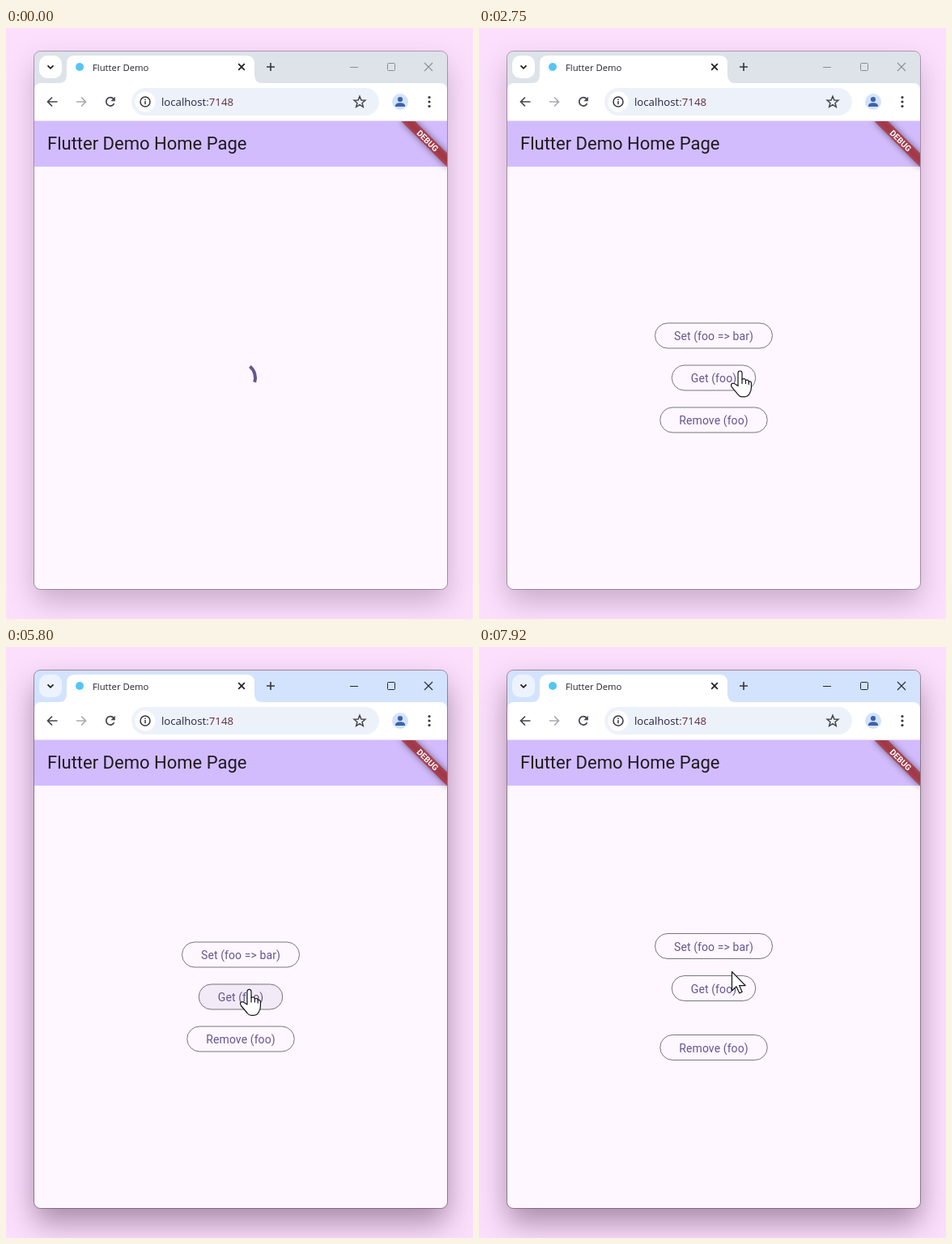
Animation, 577 px wide and 729 px high, one loop 7990 ms. Source, as an HTML page with a canvas:

```html
<!DOCTYPE html>
<html lang="en">
<head>
<meta charset="utf-8">
<title>Flutter Demo</title>
<style>
html, body { margin: 0; width: 100%; height: 100%; overflow: hidden; background: #fcdffd; }
canvas { display: block; width: 577px; height: 729px; }
</style>
</head>
<body>
<canvas id="stage" width="577" height="729"></canvas>
<script>
const W = 577, H = 729, LOOP = 7990;
const PRIMARY = '#65558f', INK = '#1d1b20', DARK = '#33343c';
const ROBOTO = 'Roboto, sans-serif', UI = '"Open Sans", sans-serif';
const stage = document.getElementById('stage').getContext('2d');

function roundRect(c, x, y, w, h, r) {
  c.beginPath();
  c.roundRect(x, y, w, h, r);
}

function fillRound(c, x, y, w, h, r, color) {
  roundRect(c, x, y, w, h, r);
  c.fillStyle = color;
  c.fill();
}

function disc(c, x, y, r, color) {
  c.beginPath();
  c.arc(x, y, r, 0, 7);
  c.fillStyle = color;
  c.fill();
}

function path(c, d, color, width) {
  c.strokeStyle = color;
  c.lineWidth = width;
  c.stroke(new Path2D(d));
}

function text(c, str, x, y, font, color, spacing = 0, align = 'left') {
  c.font = font;
  c.fillStyle = color;
  c.letterSpacing = spacing + 'px';
  c.textAlign = align;
  c.fillText(str, x, y);
}

// ---- browser window ----

function drawTabStrip(c, active) {
  c.fillStyle = active ? '#d3e3fd' : '#dde3e9';
  c.fillRect(35, 29, 510, 50);
  fillRound(c, 41, 34, 28, 28, 10, active ? '#edf3fe' : '#ffffff');
  path(c, 'M51.5 46.3L55 49.8L58.5 46.3', '#1f1f1f', 1.8);

  c.fillStyle = '#fff';
  c.fill(new Path2D('M65 68Q75 68 75 58V44Q75 34 85 34H297Q307 34 307 44V58Q307 68 317 68Z'));
  disc(c, 91, 48, 5, '#54c5f8');
  text(c, 'Flutter Demo', 107, 53, '11.3px ' + UI, '#24242c');
  path(c, 'M287.2 44.2L294.8 51.8M294.8 44.2L287.2 51.8', '#1f1f1f', 1.7);
  path(c, 'M327 43V53M322 48H332', DARK, 1.6);

  const tone = active ? '#222730' : '#8b8f96';
  path(c, 'M425 48.5H435', tone, 1);
  roundRect(c, 471.5, 43.5, 9, 9, 1);
  c.stroke();
  path(c, 'M517 43L527 53M527 43L517 53', tone, 1.1);
}

function drawToolbar(c) {
  fillRound(c, 35, 68, 510, 47, [8, 8, 0, 0], '#fff');
  path(c, 'M63.5 91H52M57 85.5L51.5 91L57 96.5', '#45454d', 1.7);
  path(c, 'M87 91H98.5M93 85.5L98.5 91L93 96.5', '#a9a9b0', 1.7);
  path(c, 'M133.6 93.2A5.2 5.2 0 1 1 133 87.6', '#45454d', 1.7);
  c.fillStyle = '#45454d';
  c.fill(new Path2D('M134.8 84.8V90.2H129.4Z'));

  fillRound(c, 155, 74, 306, 34, 17, '#edf2fa');
  disc(c, 172, 91, 12.5, '#fff');
  c.beginPath();
  c.arc(172, 91, 6, 0, 7);
  c.strokeStyle = '#35353d';
  c.lineWidth = 1.5;
  c.stroke();
  path(c, 'M172 90V94.3M172 87.5V89', '#35353d', 1.5);
  text(c, 'localhost', 192, 96, '13.2px ' + UI, '#25223f');
  text(c, ':7148', 247.3, 96, '13.2px ' + UI, '#5b2d40');

  c.beginPath();
  for (let i = 0; i < 10; i++) {
    const r = i % 2 ? 3.2 : 7.3, a = i * Math.PI / 5 - Math.PI / 2;
    c.lineTo(437 + r * Math.cos(a), 91.5 + r * Math.sin(a));
  }
  c.closePath();
  c.strokeStyle = '#45454d';
  c.lineWidth = 1.5;
  c.stroke();

  disc(c, 487, 91, 10, '#d3e3fd');
  disc(c, 487, 88, 3.1, '#3b62ad');
  c.fill(new Path2D('M481 97V95.5Q482 92.3 487 92.3Q492 92.3 493 95.5V97Z'));
  for (const y of [85.5, 91, 96.5]) disc(c, 523, y, 1.6, '#35353d');
}

function drawPage(c) {
  c.fillStyle = '#fef7ff';
  c.fillRect(35, 115, 510, 578);
  c.fillStyle = '#d3bcfd';
  c.fillRect(35, 114.5, 510, 56.5);
  text(c, 'Flutter Demo Home Page', 51, 150, '22px ' + ROBOTO, INK);

  c.save();
  c.beginPath();
  c.rect(35, 115, 510, 578);
  c.clip();
  c.translate(545, 115);
  c.rotate(Math.PI / 4);
  c.filter = 'blur(4px)';
  c.fillStyle = 'rgba(0,0,0,.5)';
  c.fillRect(-40, 28, 80, 12);
  c.filter = 'none';
  c.fillStyle = 'rgba(183,28,28,.63)';
  c.fillRect(-40, 28, 80, 12);
  text(c, 'DEBUG', 0, 37.7, 'bold 10.2px ' + ROBOTO, '#fff', 0, 'center');
  c.restore();
}

function makeWindow(active) {
  const cv = document.createElement('canvas');
  cv.width = W;
  cv.height = H;
  const c = cv.getContext('2d');
  c.fillStyle = '#fcdffd';
  c.fillRect(0, 0, W, H);
  c.save();
  c.shadowColor = active ? 'rgba(50,20,50,.42)' : 'rgba(50,20,50,.25)';
  c.shadowBlur = active ? 36 : 34;
  c.shadowOffsetY = active ? 18 : 16;
  fillRound(c, 35, 29, 510, 663, 8, '#fff');
  c.restore();

  c.save();
  roundRect(c, 35, 29, 510, 663, 8);
  c.clip();
  drawTabStrip(c, active);
  drawToolbar(c);
  drawPage(c);
  c.restore();
  roundRect(c, 34.5, 28.5, 511, 664, 8);
  c.strokeStyle = active ? 'rgba(70,60,75,.5)' : 'rgba(70,60,75,.42)';
  c.lineWidth = 1;
  c.stroke();
  return cv;
}

// ---- progress ring ----

// cubic-bezier(.4, 0, .2, 1)
function fastOutSlowIn(x) {
  if (x <= 0) return 0;
  if (x >= 1) return 1;
  let lo = 0, hi = 1, s = 0.5;
  for (let i = 0; i < 20; i++) {
    s = (lo + hi) / 2;
    const u = 1 - s;
    if (1.2 * u * u * s + 0.6 * u * s * s + s ** 3 < x) lo = s; else hi = s;
  }
  return 3 * (1 - s) * s * s + s ** 3;
}

function drawRing(c, t) {
  const e = 170 + t * 0.944, p = e / 1333 % 1;
  const head = fastOutSlowIn(p * 2), tail = fastOutSlowIn(p * 2 - 1);
  const start = Math.PI * (-0.5 + tail * 1.5 + e / 2222 * 2 + p * 0.5);
  c.beginPath();
  c.arc(290, 431.5, 18, start, start + Math.max((head - tail) * 1.5 * Math.PI, 0.001));
  c.strokeStyle = PRIMARY;
  c.lineWidth = 4;
  c.stroke();
}

// ---- buttons ----

const BUTTONS = [
  { label: 'Set (foo => bar)', w: 146 },
  { label: 'Get (foo)', w: 104.5 },
  { label: 'Remove (foo)', w: 133.5 }
];
const SHOW = 1940, FOCUS = 3570, BAR = 5940, CLEARED = 7100;

function buttonTops(t) {
  if (t < BAR) return [363.5, 415.5, 467.5];
  return t < CLEARED ? [353.5, 405.5, 477.5] : [353, 405, 478];
}

const hit = (p, tops) => p ? BUTTONS.findIndex((b, i) =>
  Math.abs(p.x - 290) < b.w / 2 && p.y >= tops[i] && p.y < tops[i] + 32) : -1;

// press time, release time, button
const CLICKS = [[3430, 3640, 1], [4520, 4730, 0], [5810, 6010, 1], [6890, 7100, 2]];

function drawRipple(c, t, i) {
  for (const [down, up, target] of CLICKS) {
    const age = t - down, fade = 1 - Math.max(0, t - up) / 230;
    if (target !== i || age < 0 || fade <= 0) continue;
    const p = cursorAt(down);
    c.globalAlpha = 0.1 * fade;
    disc(c, p.x, p.y, 20 + 90 * fastOutSlowIn(age / 300), PRIMARY);
    c.globalAlpha = 1;
  }
}

function drawButtons(c, t) {
  const tops = buttonTops(t), over = hit(cursorAt(t - 80), tops);
  BUTTONS.forEach(({ label, w }, i) => {
    const x = 290 - w / 2, y = tops[i];
    c.save();
    roundRect(c, x, y, w, 32, 16);
    c.clip();
    if (over === i) {
      c.fillStyle = 'rgba(101,85,143,.08)';
      c.fillRect(x, y, w, 32);
    }
    drawRipple(c, t, i);
    c.restore();
    roundRect(c, x + 0.5, y + 0.5, w - 1, 31, 15.5);
    c.strokeStyle = '#79747e';
    c.lineWidth = 1;
    c.stroke();
    text(c, label, 290, y + 21.5, '14px ' + ROBOTO, PRIMARY, 0.1, 'center');
  });
  if (t >= BAR && t < CLEARED) text(c, 'bar', 290, 463, '14px ' + ROBOTO, INK, 0.25, 'center');
}

// ---- pointer ----

// time, x, y of the hot spot
const TRACK = [
  [2270, 538, 712], [2480, 455, 575], [2690, 345, 448], [2830, 290, 392], [2960, 276, 379],
  [3220, 276, 379], [3400, 303, 428], [4040, 303, 428], [4180, 304, 390], [4300, 304, 378],
  [5470, 304, 378], [5670, 299, 423], [6220, 299, 423], [6410, 306, 436], [6490, 312, 464],
  [6690, 312, 494], [7780, 312, 494], [7850, 312, 440], [7920, 312, 400]
];

function cursorAt(t) {
  if (t < TRACK[0][0]) return null;
  const n = TRACK.findIndex(k => k[0] > t);
  if (n < 0) {
    const [, x, y] = TRACK[TRACK.length - 1];
    return { x, y };
  }
  const [t0, x0, y0] = TRACK[n - 1], [t1, x1, y1] = TRACK[n];
  const f = (t - t0) / (t1 - t0);
  return { x: x0 + (x1 - x0) * f, y: y0 + (y1 - y0) * f };
}

const ARROW = new Path2D('M.5 .5V24L6 18.8L9.8 27L13.2 25.4L9.6 17.6H17.2Z');
const HAND = new Path2D('M-1 18V2Q-1 -.6 1.5 -.6Q4 -.6 4 2V9.5Q8 8 8.4 11Q11.8 9.5 12.2 12.5' +
  'Q15.4 11.6 15.4 15V20Q15.4 24 13.4 27Q11.5 31.3 7 31.3H4Q1 31.3 -1 28.5L-8.5 19.5' +
  'Q-10.5 16.5 -8.5 15Q-6.5 14 -4 16Z');
const FINGERS = 'M4 9.5V15.5M8.4 11V15.5M12.2 12.5V16.5';

function drawCursor(c, t) {
  const p = cursorAt(t);
  if (!p) return;
  if (CLICKS.some(([down, up]) => t >= down && t < up)) disc(c, p.x, p.y, 18, 'rgba(255,255,0,.7)');
  const hand = hit(p, buttonTops(t)) >= 0, shape = hand ? HAND : ARROW;
  c.save();
  c.translate(p.x, p.y);
  c.lineJoin = 'round';
  c.fillStyle = '#fff';
  c.fill(shape);
  c.strokeStyle = '#15151a';
  c.lineWidth = 1.2;
  c.stroke(shape);
  if (hand) path(c, FINGERS, '#15151a', 1.2);
  c.restore();
}

// ---- loop ----

const idle = makeWindow(false), focused = makeWindow(true);

function frame(now) {
  const t = now % LOOP;
  stage.drawImage(t < FOCUS ? idle : focused, 0, 0);
  if (t < SHOW) drawRing(stage, t);
  else drawButtons(stage, t);
  drawCursor(stage, t);
}

const begin = performance.now();
function tick() {
  frame(performance.now() - begin);
  requestAnimationFrame(tick);
}
tick();
</script>
</body>
</html>
```
